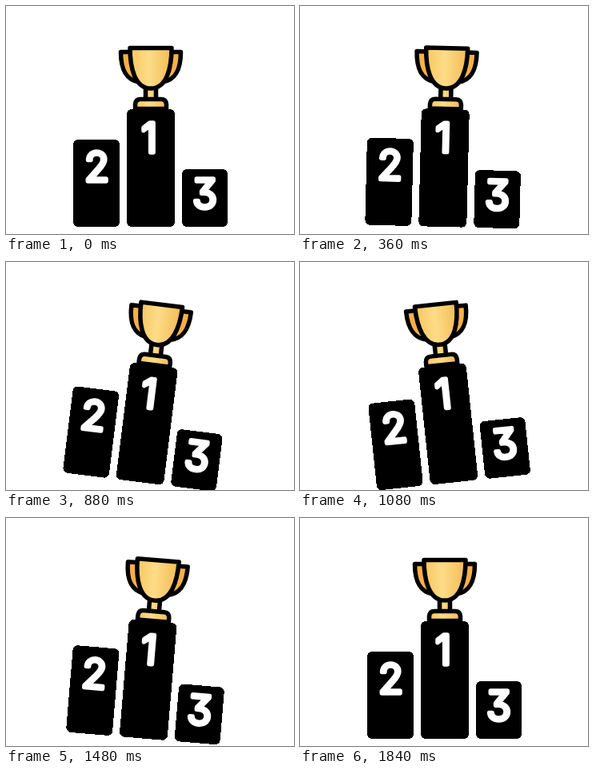
Animation, 360 px wide and 285 px high, one loop 2600 ms. Source, as an HTML page:

```html
<!DOCTYPE html>
<html lang="en">
<head>
<meta charset="utf-8">
<title>Winners' podium</title>
<style>
  html, body { margin: 0; width: 100%; height: 100%; overflow: hidden; background: #fff; }
  svg { display: block; width: 100vw; height: 100vh; }
  .trophy { stroke: #000; stroke-width: 5.5; stroke-linejoin: round; }
  rect { shape-rendering: crispEdges; }
  text {
    font: 300 50px Inter, "Open Sans", sans-serif;
    font-feature-settings: "cv09"; /* flat-topped three */
    text-anchor: middle;
    fill: #fff; stroke: #fff; stroke-width: 5.5; stroke-linejoin: round;
  }
</style>
</head>
<body>
<svg viewBox="0 0 360 285">
  <defs>
    <linearGradient id="gold">
      <stop offset="0" stop-color="#f8c65f"/>
      <stop offset=".45" stop-color="#fddc88"/>
      <stop offset="1" stop-color="#f3bb55"/>
    </linearGradient>
  </defs>
  <g id="podium">
    <g class="trophy" fill="url(#gold)">
      <path fill="#f5b04a" d="M157 57.500H143.500C143.500 78 149 92 166 95ZM205 57.500H218.500C218.500 78 213 92 196 95Z"/>
      <path d="M174.500 101H187.500V118H174.500Z"/>
      <path d="M155 52.500H207C207 77 201 103 181 103C161 103 155 77 155 52.500Z"/>
      <path d="M161.500 128.500V123Q162 116.500 168 116.500H194Q200 116.500 200.500 123V128.500Z"/>
    </g>
    <rect x="84" y="167" width="58" height="109" rx="6"/>
    <rect x="151" y="129" width="60" height="147" rx="6"/>
    <rect x="220" y="204" width="57" height="72" rx="6"/>
    <text x="113.500" y="218.500">2</text>
    <text x="179" y="182.500">1</text>
    <text x="248.500" y="252.500">3</text>
  </g>
</svg>
<script>
  const podium = document.getElementById("podium");
  const LOOP = 2600, STEP = 40, MOVING = 1840, WIGGLE = MOVING / 3;

  // One wiggle: [time in ms, tilt in degrees]
  const keys = [[0, 0], [93, -1.5], [160, -10], [300, 10], [360, 1.4],
                [413, 0], [507, -10], [600, 0], [WIGGLE, 0]];

  const ease = x => x * x * (3 - 2 * x);

  function tilt(time) {
    if (time >= MOVING) return 0;
    const t = time % WIGGLE;
    const i = keys.findIndex(key => key[0] > t);
    const [t0, a0] = keys[i - 1], [t1, a1] = keys[i];
    return a0 + (a1 - a0) * ease((t - t0) / (t1 - t0));
  }

  const start = performance.now();
  function draw() {
    const time = (performance.now() - start) % LOOP;
    const angle = tilt(Math.floor(time / STEP) * STEP);
    podium.setAttribute("transform", `rotate(${angle} 181 163)`);
    requestAnimationFrame(draw);
  }
  draw();
</script>
</body>
</html>
```
